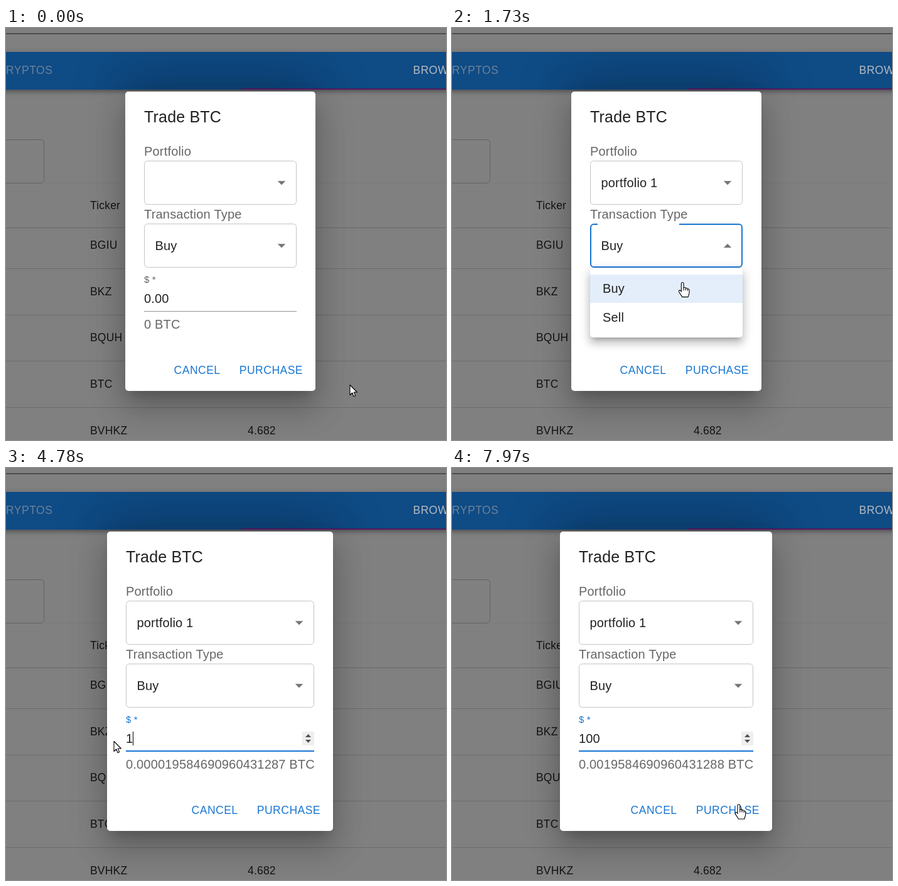
Write an HTML page with a canvas that moves like this. It is 701 by 655 pixels and loops after 8 s.

```html
<!DOCTYPE html>
<html lang="en">
<head>
<meta charset="utf-8">
<title>Trade dialog</title>
<style>
  html, body { margin: 0; width: 100%; height: 100%; overflow: hidden; background: #808080; }
  canvas { display: block; }
</style>
</head>
<body>
<canvas id="stage" width="701" height="655"></canvas>
<script>
const ctx = document.getElementById('stage').getContext('2d');
const LOOP = 8000, STEP = 78.2, U = 1.25;
const BLUE = '#1976d2', INK = '#212121', MUTED = '#666';
const FONT = '"Liberation Sans", Arial, sans-serif';

// Cursor path: time, x, y, shape used from that time on
const PATH = [
  [0, 547.5, 567, 'arrow'], [450, 345, 250, 'hand'], [560, 345, 252, 'hand'],
  [840, 345, 313, 'hand'], [1140, 345, 313, 'arrow'], [1240, 344.5, 337, 'arrow'],
  [1390, 350, 348, 'hand'], [1480, 352, 352, 'hand'], [1700, 371, 403, 'hand'],
  [1860, 323, 418, 'hand'], [1940, 323, 418, 'hand'], [2040, 325, 430, 'hand'],
  [2190, 325, 430, 'arrow'], [2430, 300, 432, 'beam'], [2600, 268, 431, 'beam'],
  [2960, 164, 437, 'beam'], [3035, 164, 437, 'beam'], [3040, 176, 443, 'beam'],
  [3190, 176, 443, 'beam'], [3195, 171.5, 434, 'arrow'], [6150, 171.5, 434, 'arrow'],
  [6240, 240, 436, 'beam'], [6480, 440, 435, 'beam'], [7640, 440, 435, 'beam'],
  [7720, 445, 470, 'arrow'], [7890, 457, 534.5, 'hand']
];

// Amount typed, conversion shown and width of the fields
const AMOUNTS = [
  { from: 0, value: '0.00', coins: '0', width: 243 },
  { from: 4780, value: '1', coins: '0.000019584690960431287', width: 300 },
  { from: 4860, value: '10', coins: '0.00019584690960431286', width: 289 },
  { from: 7200, value: '100', coins: '0.0019584690960431288', width: 278 }
];
const BLINKS = [4780, 5410, 5940, 6480, 6970, 7730];

const MENUS = [
  { y: 282, open: 500, close: 1142, time: 207, items: ['portfolio 1'] },
  { y: 382, open: 1440, close: 2195, time: 232, items: ['Buy', 'Sell'] }
];

const clamp = v => Math.min(1, Math.max(0, v));

// cubic-bezier(.4, 0, .2, 1)
function ease(p) {
  p = clamp(p);
  let lo = 0, hi = 1;
  for (let i = 0; i < 20; i++) {
    const s = (lo + hi) / 2, r = 1 - s;
    if (3 * r * r * s * .4 + 3 * r * s * s * .2 + s * s * s < p) lo = s; else hi = s;
  }
  return lo * lo * (3 - 2 * lo);
}

function setFont(size, spacing) {
  ctx.font = size + 'px ' + FONT;
  ctx.letterSpacing = size * spacing + 'px';
}

function text(str, x, y, size, color, spacing = .00938) {
  setFont(size, spacing);
  ctx.fillStyle = color;
  ctx.fillText(str, x, y);
}

function fill(x, y, w, h, color) {
  ctx.fillStyle = color;
  ctx.fillRect(x, y, w, h);
}

function round(x, y, w, h, r) {
  ctx.beginPath();
  ctx.roundRect(x, y, w, h, r);
}

function poly(color, ...pts) {
  ctx.beginPath();
  for (let i = 0; i < pts.length; i += 2) ctx.lineTo(pts[i], pts[i + 1]);
  ctx.closePath();
  ctx.fillStyle = color;
  ctx.fill();
}

// Only the shadow is painted; the shape itself lies off stage
function shadow(x, y, w, h, dy, blur, spread, alpha) {
  const s = spread * U;
  ctx.save();
  ctx.shadowColor = `rgba(0,0,0,${alpha})`;
  ctx.shadowBlur = blur * U;
  ctx.shadowOffsetX = 3000;
  ctx.shadowOffsetY = dy * U;
  ctx.fillStyle = '#000';
  round(x - s - 3000, y - s, w + 2 * s, h + 2 * s, 5);
  ctx.fill();
  ctx.restore();
}

function page(left, width) {
  fill(0, 0, 701, 655, '#808080');
  fill(0, 8, 701, 2, '#4c4c4c');

  shadow(-40, 38, 781, 60, 2, 4, -1, .2);
  shadow(-40, 38, 781, 60, 4, 5, 0, .14);
  shadow(-40, 38, 781, 60, 1, 10, 0, .12);
  fill(0, 38, 701, 60, '#0f4b85');
  ctx.save();
  ctx.beginPath();
  ctx.rect(0, 38, 701, 60);
  ctx.clip();
  shadow(left, 85, width, 60, 0, 70, 4, .22);
  ctx.restore();
  fill(375, 96, 326, 2, '#561762');
  text('RYPTOS', 0, 73, 17.5, '#6a8299', .02857);
  text('BROWSE', 648.5, 73, 17.5, '#b4bac0', .02857);

  ctx.strokeStyle = '#626262';
  ctx.lineWidth = 1;
  round(-40.5, 177.5, 101, 69, 5);
  ctx.stroke();

  fill(61, 246, 640, 1, '#7b7b7b');
  for (const y of [317, 382, 456, 529, 603]) fill(0, y, 701, 1, '#6b6b6b');
  const rows = { Ticker: 288, BGIU: 351, BKZ: 425, BQUH: 498, BTC: 572, BVHKZ: 646 };
  for (const name in rows) text(name, 134, rows[name], 17.5, '#141414', .01071);
  text('4.682', 385, 646, 17.5, '#141414', .01071);
}

function card(x, w) {
  shadow(x, 101, w, 476, 11, 15, -7, .2);
  shadow(x, 101, w, 476, 24, 38, 3, .14);
  shadow(x, 101, w, 476, 9, 46, 8, .12);
  ctx.fillStyle = '#fff';
  round(x, 101, w, 476, 5);
  ctx.fill();
}

function select(x, y, w, label, value, focused, open, notch) {
  text(label, x, y - 8, 20, MUTED);
  ctx.lineWidth = focused ? 2 : 1;
  ctx.strokeStyle = focused ? BLUE : '#c4c4c4';
  const d = ctx.lineWidth / 2;
  round(x + d, y + d, w - 2 * d, 70 - 2 * d, 5);
  ctx.stroke();
  if (focused) fill(x + 12, y - 1, notch, 4, '#fff');
  text(value, x + 17.5, y + 42, 20, INK);
  const c = x + w - 24, top = open ? y + 38.2 : y + 32.3, tip = open ? y + 32 : y + 38.5;
  poly('#757575', c - 6.25, top, c + 6.25, top, c, tip);
}

function amount(x, w, state, t, st, cursorX) {
  const focused = st >= 2590, { value } = state;
  text('$ *', x, 405, 15, focused ? BLUE : MUTED);
  text(value, x, 437, 20, INK);
  if (focused) fill(x, 449, w, 2, BLUE); else fill(x, 450, w, 1, '#949494');

  if (focused && t < 4780) {
    let from = value.length;
    setFont(20, .00938);
    const at = n => ctx.measureText(value.slice(0, n)).width;
    while (from > 0 && x + at(from - 1) + 5 > cursorX) from--;
    const a = x + at(from), b = x + at(value.length);
    if (b > a) {
      fill(a, 419, b - a, 22, '#3390ff');
      text(value.slice(from), a, 437, 20, '#fff');
    }
  }
  if (BLINKS.filter(b => t >= b).length % 2 || (t >= 7200 && t < 7730)) {
    setFont(20, .00938);
    fill(Math.round(x + ctx.measureText(value).width - .4), 419, 1, 22, '#000');
  }
  if (st >= 2430) {
    const r = x + w, c = r - 9.5;
    fill(r - 19, 419, 19, 22, '#efefef');
    poly('#505050', c - 4.5, 428, c + 4.5, 428, c, 423);
    poly('#505050', c - 4.5, 432, c + 4.5, 432, c, 437);
  }
  text(state.coins + ' BTC', x, 478, 20, MUTED);
}

function menu(m, x, w, st) {
  if (st < m.open || st > m.close + m.time) return;
  const closing = st >= m.close;
  const p = (st - (closing ? m.close : m.open)) / m.time;
  const alpha = closing ? 1 - ease(p) : ease(p);
  const grow = closing ? 1 - ease((p - .333) / .666) : ease(p / .666);
  const sx = .75 + .25 * grow, sy = .5625 + .4375 * grow;
  const h = 20 + 45 * m.items.length;
  const box = [x + w * (1 - sx) / 2, m.y, w * sx, h * sy];

  ctx.save();
  ctx.globalAlpha = alpha;
  shadow(...box, 5, 5, -3, .2);
  shadow(...box, 8, 10, 1, .14);
  shadow(...box, 3, 14, 2, .12);
  ctx.fillStyle = '#fff';
  round(...box, 5);
  ctx.fill();

  ctx.translate(box[0], m.y);
  ctx.scale(sx, sy);
  if (m.items.length > 1) fill(0, 10, w, 45, '#e3eefa');
  else {
    fill(0, 10, w, 45, '#f5f5f5');
    if (closing) {
      ctx.fillStyle = 'rgba(0,0,0,.2)';
      round(14, 10, 172, 45, 8);
      ctx.fill();
    }
  }
  m.items.forEach((item, i) => text(item, 20, 39 + 46 * i, 20, INK));
  ctx.restore();
}

const ARROW = new Path2D('M.5 .5V16.5L4.2 13L6.6 18.7L9.2 17.6L6.8 12H11.8Z');
const HAND = new Path2D('M-2 13V2.2a1.9 1.9 0 0 1 3.8 0V8.6q2.6-.9 3.2.9q2.6-.7 3.1 1.1q2.6-.3 2.6 2.2V17L8.8 23.5H-.5L-5.6 15.6q-.9-2.6 1.2-2.9q1.2 0 2.4 2.3Z');
const BEAM = new Path2D('M-3.5-8.5H-1L0-7.5L1-8.5H3.5M0-7.5V7.5M-3.5 8.5H-1L0 7.5L1 8.5H3.5');

function pointer({ x, y, shape }) {
  ctx.save();
  ctx.translate(x, y);
  ctx.lineWidth = 1.1;
  ctx.lineJoin = 'round';
  ctx.strokeStyle = '#000';
  ctx.fillStyle = '#fff';
  const path = shape === 'arrow' ? ARROW : shape === 'hand' ? HAND : BEAM;
  if (path !== BEAM) ctx.fill(path);
  ctx.stroke(path);
  if (path === HAND) ctx.stroke(new Path2D('M1.8 8V13M5 9.5V13M8.1 10.8V13.5'));
  ctx.restore();
}

function cursorAt(t) {
  let i = 0;
  while (i < PATH.length - 1 && PATH[i + 1][0] <= t) i++;
  const a = PATH[i], b = PATH[i + 1] || a;
  const p = b === a ? 0 : (t - a[0]) / (b[0] - a[0]);
  return { x: a[1] + (b[1] - a[1]) * p, y: a[2] + (b[2] - a[2]) * p, shape: a[3] };
}

function draw(t) {
  const k = Math.floor((t - 70) / STEP);
  const st = k < 0 ? 0 : 70 + k * STEP;
  const state = AMOUNTS.filter(a => t >= a.from).pop();
  const w = state.width, x = Math.round(341.2 - w / 2), right = x + w + 30;
  const cursor = cursorAt(st);
  const [first, second] = MENUS;
  const isOpen = m => st >= m.open && st < m.close;

  page(x - 30, w + 60);
  card(x - 30, w + 60);
  text('Trade BTC', x, 150, 25, INK, .0075);
  select(x, 211, w, 'Portfolio', st >= first.close ? 'portfolio 1' : '',
    st >= first.open && st < second.open, isOpen(first), 69);
  select(x, 311, w, 'Transaction Type', 'Buy',
    st >= second.open && st < 2590, isOpen(second), 130);
  amount(x, w, state, t, st, cursor.x);
  text('CANCEL', right - 225.4, 550, 17.5, BLUE, .02857);
  text('PURCHASE', right - 121.2, 550, 17.5, BLUE, .02857);
  for (const m of MENUS) menu(m, x, w, st);
  pointer(cursor);
}

const start = performance.now();
function frame() {
  draw((performance.now() - start) % LOOP);
  requestAnimationFrame(frame);
}
frame();
</script>
</body>
</html>
```
